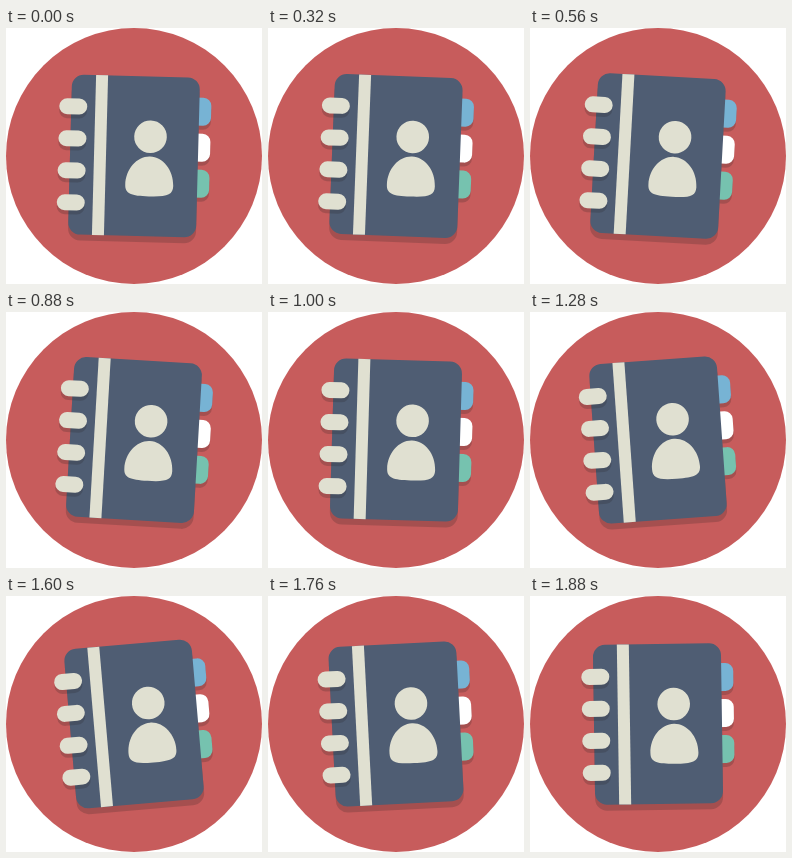
Recreate the animation shown at these times as an HTML page. Size 256 by 256 pixels, loop 1.92 s.

```html
<!DOCTYPE html>
<html lang="en">
<head>
<meta charset="utf-8">
<title>Swinging address book</title>
<style>
  html, body { margin: 0; width: 100%; height: 100%; overflow: hidden; background: #fff; }
  svg { display: block; width: 100vw; height: 100vh; }
  .shade { fill: #231f20; opacity: .2; }
</style>
</head>
<body>
<svg viewBox="0 0 256 256">
  <defs>
    <g id="rings">
      <rect x="52" y="72" width="28" height="16" rx="8"/>
      <rect x="52" y="104" width="28" height="16" rx="8"/>
      <rect x="52" y="136" width="28" height="16" rx="8"/>
      <rect x="52" y="168" width="28" height="16" rx="8"/>
    </g>
    <rect id="tab" x="172" width="32" height="28" rx="8"/>
    <rect id="cover" x="64" y="48" width="128" height="160" rx="12"/>
  </defs>
  <circle cx="128" cy="128" r="128" fill="#c75c5c"/>
  <g id="book">
    <g class="shade">
      <use href="#cover" y="6"/>
      <use href="#tab" y="72"/>
      <use href="#tab" y="108"/>
      <use href="#tab" y="144"/>
    </g>
    <use href="#tab" y="68" fill="#77b3d4"/>
    <use href="#tab" y="104" fill="#fff"/>
    <use href="#tab" y="140" fill="#76c2af"/>
    <use href="#cover" fill="#4f5d73"/>
    <use href="#rings" y="4" class="shade"/>
    <g fill="#e0e0d1">
      <rect x="88" y="48" width="12" height="160"/>
      <use href="#rings"/>
      <circle cx="144" cy="108.3" r="16.3"/>
      <path d="M120 157C120 141 131 128 144 128S168 141 168 157C168 166 162 168 144 168S120 166 120 157Z"/>
    </g>
  </g>
</svg>
<script>
  const LOOP = 1920, STEP = 40;
  const book = document.getElementById('book');
  // [time in ms, angle in degrees]; the last swing is cut off by the loop
  const swing = [[0, 1.5], [810, 3.6], [1430, -5.3], [1500, -5.3], [2260, 3.6]];

  function angleAt(t) {
    const i = swing.findIndex(([time]) => time > t);
    const [t0, a0] = swing[i - 1], [t1, a1] = swing[i];
    const ease = (1 - Math.cos(Math.PI * (t - t0) / (t1 - t0))) / 2;
    return a0 + (a1 - a0) * ease;
  }

  function draw() {
    const t = Math.floor(performance.now() % LOOP / STEP) * STEP;
    book.setAttribute('transform', `rotate(${angleAt(t)} 128 128)`);
    requestAnimationFrame(draw);
  }
  draw();
</script>
</body>
</html>
```
